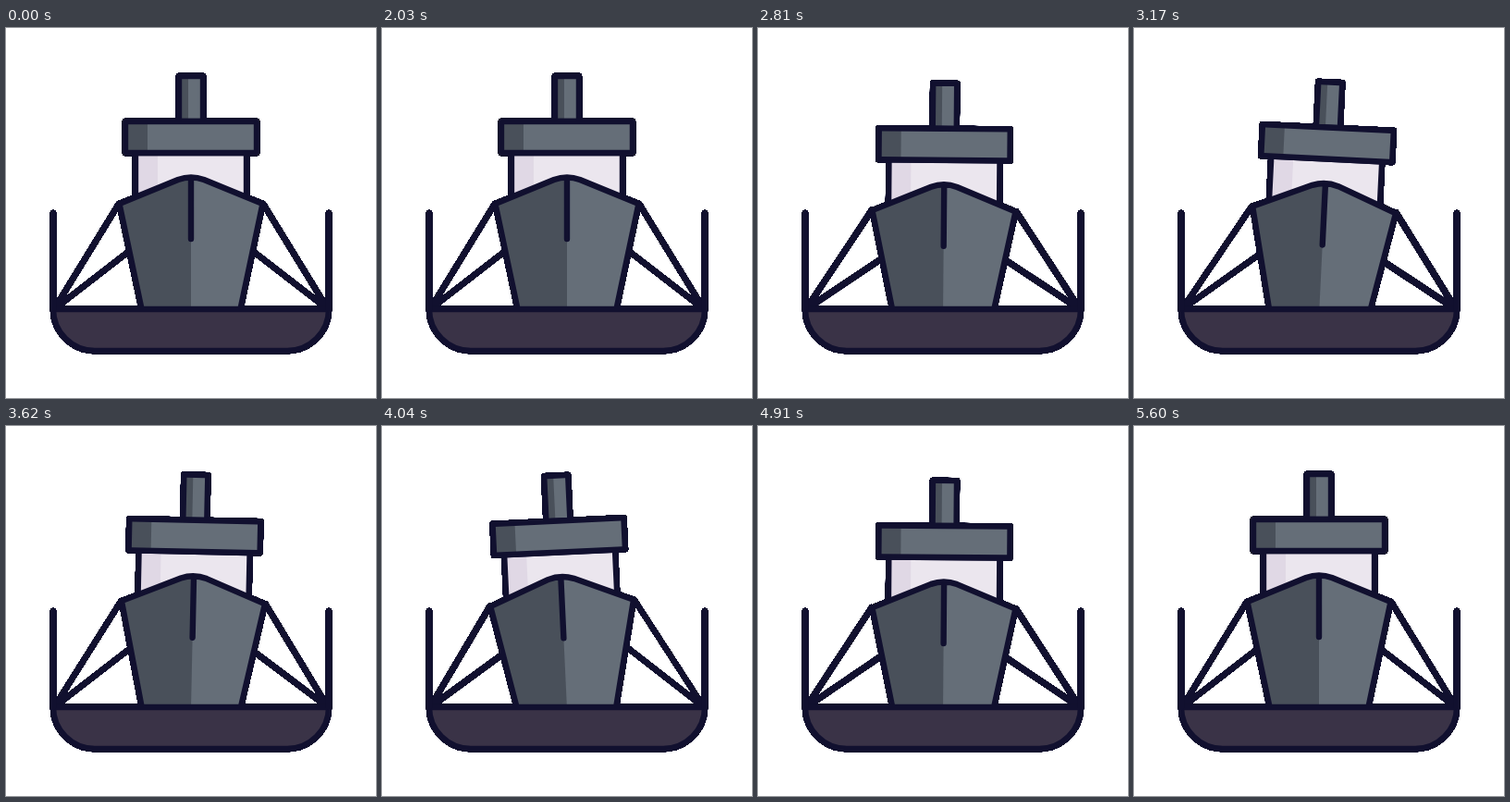
Write an HTML page without scripts that moves like this. It is 400 px wide and 400 px high and loops after 5.63 s.

```html
<!DOCTYPE html>
<html lang="en">
<head>
<meta charset="utf-8">
<title>Ship in dock</title>
<style>
  @property --bob { syntax: "<number>"; inherits: true; initial-value: 0; }
  @property --tilt { syntax: "<angle>"; inherits: true; initial-value: 0deg; }

  html, body { margin: 0; width: 100%; height: 100%; overflow: hidden; background: #fff; }

  svg {
    display: block;
    width: 100%;
    height: 100%;
    stroke-width: 6.4;
    stroke-linecap: round;
    stroke-linejoin: round;
    animation: bob 5630ms infinite, tilt 5630ms infinite;
    animation-timing-function: cubic-bezier(.37, 0, .63, 1);
  }

  .line { fill: none; stroke: #11102f; }
  .dark { fill: #49505a; }
  .grey { fill: #656e78; }
  .pale { fill: #ebe6ee; }
  .lilac { fill: #e0d8e5; }
  .dock { fill: #3a3347; stroke: #11102f; }

  .ship {
    transform-origin: 200px 305px;
    transform: translateY(calc(var(--bob) * 1px)) rotate(var(--tilt));
  }

  /* Shearing about the dock anchor keeps the far rope end on the hull. */
  .rope {
    --lift: calc(var(--bob) * var(--side) * .8deg);
    transform: skew(calc(var(--tilt) * -1), calc(var(--lift) - var(--tilt) * 1.08));
  }
  .left { --side: 1; transform-origin: 52px 304px; }
  .right { --side: -1; transform-origin: 348px 304px; }

  @keyframes bob {
    0%, 35.524%, 67.496%, 99.467%, 100% { --bob: 0; }
    51.51%, 83.481% { --bob: 8; }
  }
  @keyframes tilt {
    0%, 35.524%, 99.467%, 100% { --tilt: 0deg; }
    43.517% { --tilt: -1.05deg; }
    58.615% { --tilt: 3deg; }
    74.067% { --tilt: -3deg; }
    91.474% { --tilt: 1deg; }
  }
</style>
</head>
<body>
<svg viewBox="0 0 400 400">
  <!-- Hard outer edges: any partly covered pixel becomes solid. -->
  <filter id="crisp" filterUnits="userSpaceOnUse" x="0" y="0" width="400" height="400" color-interpolation-filters="sRGB">
    <feComponentTransfer>
      <feFuncA type="linear" slope="20" intercept="-1"/>
    </feComponentTransfer>
  </filter>

  <g filter="url(#crisp)">
    <path class="line rope left" d="M122 190 52 304 136 239"/>
    <path class="line rope right" d="M278 190 348 304 264 239"/>

    <g class="ship">
      <path class="pale" d="M140 135H260V210H140Z"/>
      <path class="lilac" d="M140 135H164V210H140Z"/>
      <path class="line" d="M140 135H260V210H140Z"/>

      <path class="grey" d="M187 52H213V101H187Z"/>
      <path class="dark" d="M187 52H197V101H187Z"/>
      <path class="line" d="M187 52H213V101H187Z"/>

      <path class="grey" d="M129 101H271V135H129Z"/>
      <path class="dark" d="M129 101H153V135H129Z"/>
      <path class="line" d="M129 101H271V135H129Z"/>

      <path class="grey" d="M151 325 122.5 190 186 164Q200 159 214 164L277.5 190 249 325Z"/>
      <path class="dark" d="M151 325 122.5 190 186 164Q193 161.5 200 161.5V325Z"/>
      <path class="line" d="M151 325 122.5 190 186 164Q200 159 214 164L277.5 190 249 325M200 163V228"/>
    </g>

    <path class="dock" d="M51 304H349A45 45 0 0 1 304 349H96A45 45 0 0 1 51 304Z"/>
    <path class="line" d="M51 200V304M349 200V304"/>
  </g>
</svg>
</body>
</html>
```
